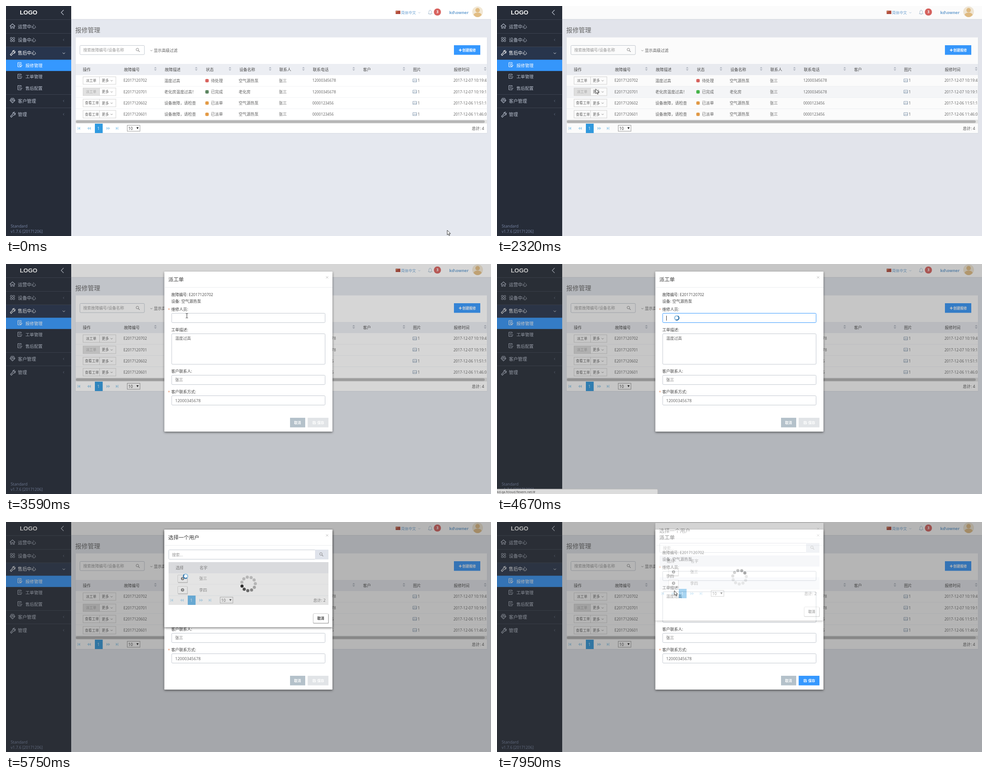
An HTML page that plays this animation: 1086x516 px, repeating every 8 s.

```html
<!DOCTYPE html>
<html lang="zh-CN">
<head>
<meta charset="utf-8">
<title>报修管理</title>
<style>
html,body{margin:0;width:100%;height:100%;overflow:hidden;background:#e5e8ef}
svg{display:block;width:100%;height:100%;font-family:"Open Sans","Noto Sans CJK SC","Noto Sans CJK",sans-serif}
.dialog{filter:drop-shadow(0 2px 2.6px rgba(0,0,0,.5))}
</style>
</head>
<body>
<svg id="stage" viewBox="0 0 1086 516"></svg>
<script>
const LOOP = 8000;
const BLUE = '#3598ff', LINE = '#e7ecf1', HEAD = '#eceef3', TEXT = '#606060', DARK = '#444', EDGE = '#c2c8d0';
const PHONE_A = '12000345678', PHONE_B = '0000123456';

// Drawing helpers; text is placed by its left edge and vertical centre
const text = (x, y, s, size = 8.9, fill = TEXT, more = '') =>
  `<text x="${x}" y="${y + size * .37}" font-size="${size}" fill="${fill}" ${more}>${s}</text>`;
const bold = (x, y, s, size, fill) => text(x, y, s, size, fill, 'font-weight="700"');
const rect = (x, y, w, h, fill, more = '') =>
  `<rect x="${x}" y="${y}" width="${w}" height="${h}" fill="${fill}" ${more}/>`;
const box = (x, y, w, h, stroke, r = 2, fill = '#fff', id = '') =>
  rect(x, y, w, h, fill, `stroke="${stroke}" rx="${r}" ${id && `id="${id}"`}`);
const line = (d, stroke, width = 1) => `<path d="${d}" fill="none" stroke="${stroke}" stroke-width="${width}"/>`;
const shape = (d, fill) => `<path d="${d}" fill="${fill}"/>`;
const circle = (x, y, r, fill, more = '') => `<circle cx="${x}" cy="${y}" r="${r}" fill="${fill}" ${more}/>`;
const group = (id, body, more = '') => `<g id="${id}" ${more}>${body}</g>`;
const down = (x, y, c, r = 2.2) => line(`M${x - r} ${y - r / 2}l${r} ${r}l${r} ${-r}`, c, .9);
const left = (x, y, c, r = 2.2) => line(`M${x + r / 2} ${y - r}l${-r} ${r}l${r} ${r}`, c, .9);
const lens = (x, y, c) => circle(x - .8, y - .8, 2.9, 'none', `stroke="${c}"`) + line(`M${x + 1.3} ${y + 1.3}l3 3`, c, 1.2);
const sorter = x => shape(`M${x - 3} 140l3 -3.2l3 3.2zM${x - 3} 142l3 3.2l3 -3.2z`, '#b4b9c3');

function wrench(x, y, c) {
  return line(`M${x - 5} ${y + 4}l5 -5q-1 -4 4 -4.4l-2 2.4l2 2l2 -2q.4 5 -4 4.2l-5 5z`, c, 1.1);
}
function sheet(x, y, c) {
  return line(`M${x + 3} ${y - 2}v-3h-7.5v9.5h7.5v-2M${x - 2.5} ${y - 2}h4M${x - 2.5} ${y + 1}h3M${x + 1} ${y + 1}h4.5`, c);
}

function sidebar() {
  const c = '#b7bfce';
  const rule = y => rect(0, y, 146, 1, '#3c4351');
  const item = (y, s, fill = c) => text(26.5, y, s, 10.2, fill);
  const sub = (y, s, fill = c) => text(43.5, y, s, 9.6, fill);
  return rect(0, 0, 146, 516, '#262c38') +
    rect(0, 91, 146, 30, '#28354d') + rect(0, 120.5, 146, 25.3, BLUE) +
    [30, 61, 91, 198, 228].map(rule).join('') +
    `<text x="31" y="19" font-size="13.3" font-weight="700" fill="#fff" font-family="Liberation Sans,sans-serif">LOGO</text>` +
    line('M129 9l-5.5 5.5l5.5 5.5', '#c3cad6', 1.1) +
    item(46, '运营中心') + item(76, '设备中心') + item(105.5, '售后中心', '#fff') +
    sub(133, '报修管理', '#fff') + sub(158.5, '工单管理') + sub(184, '售后配置') +
    item(213, '客户管理') + item(243, '管理') +
    [76, 213, 243].map(y => left(129, y, '#657084')).join('') + down(129.5, 106, '#fff', 2.6) +
    line('M8.5 45.5l6 -5.5l6 5.5M10.5 44.5v5.5h2.5v-4h3v4h2.5v-5.5', c, 1.1) +
    [[10, 70.5], [15.5, 70.5], [10, 76], [15.5, 76]].map(([x, y]) => box(x, y, 3.8, 3.8, c, 1, 'none')).join('') +
    wrench(14.5, 105, '#fff') + sheet(31, 132, '#fff') + circle(33, 133.5, 2, BLUE, 'stroke="#fff"') +
    sheet(31, 158, c) + sheet(31, 183.5, c) +
    line('M9 212l3 -5h5l3 5l-5.5 5.5zM11 212l3.5 -3l4 4M13 214l2 -2', c, 1.1) + wrench(15, 243.5, c) +
    text(10.5, 494, 'Standard', 8.9, '#7886a6') + text(10.5, 505.5, 'v1.7.6 [20171206]', 8.7, '#7886a6');
}

function topbar() {
  const c = '#6ea3d3';
  return rect(146, 0, 940, 30, '#fff') + rect(146, 29.5, 940, 1, '#d3d7de') +
    rect(872.5, 10.5, 10.5, 7.5, '#b04a3c') + circle(875, 12.8, 1.1, '#e8b85a') +
    text(884.5, 14.5, '简体中文', 8.4, c) + down(925.5, 15, '#a9c3dc') +
    line('M945.5 17.5h8.5q-1.6 -1.5 -1.6 -5q-.4 -3 -2.6 -3.4q-2.4 .4 -2.7 3.4q0 3.5 -1.6 5M948.7 19h2', '#a5bccf') +
    circle(966, 13.5, 8, '#d8635f') + bold(963.8, 13.3, '3', 8, '#fff') +
    bold(992.5, 14.5, 'kd\\owner', 9, c) +
    circle(1056, 13, 12, '#f2e8d5') + circle(1056, 9.5, 5, '#e2bd83') +
    shape('M1047 20q1 -4 6.5 -5h5q5.5 1 6.5 5q-4 5 -9 5t-9 -5z', '#e2bd83');
}

function pager(dx, dy, totalX, total) {
  const c = '#a9d6f1';
  const body = shape('M160.5 271h1.3v7h-1.3zM166 271v7l-4 -3.5zM186 271v7l-4 -3.5zM190 271v7l-4 -3.5z' +
    'M225 271v7l4 -3.5zM229 271v7l4 -3.5zM246 271v7l4 -3.5zM250 271h1.3v7h-1.3z', c) +
    rect(199, 264, 17.5, 21, '#2f9ae0') + text(204.6, 274.5, '1', 8.6, '#fff') +
    box(271.5, 267.5, 28.5, 13.5, '#999', 0) + text(274, 274.5, '10', 8.6, '#333') +
    shape('M292 272h5l-2.5 4.5z', '#222');
  return `<g transform="translate(${dx} ${dy})">${body}</g>` + text(totalX, dy + 275, '总计: ' + total, 8.9, DARK);
}

const ROWS = [
  ['派工单', 'E2017120702', '温度过高', '待处理', '#d9625e', '空气源热泵', PHONE_A, '2017-12-07 10:19:4'],
  ['派工单', 'E2017120701', '老化房温度过高！', '已完成', '#5c8560', '老化房', PHONE_A, '2017-12-07 10:19:1'],
  ['查看工单', 'E2017120602', '设备故障，请检查', '已派单', '#e39a45', '空气源热泵', PHONE_B, '2017-12-06 11:51:1'],
  ['查看工单', 'E2017120601', '设备故障，请检查', '已派单', '#e39a45', '空气源热泵', PHONE_B, '2017-12-06 11:46:0']
];

function row([act, code, desc, state, color, device, phone, date], i) {
  const y = 167.3 + 25.15 * i, off = i === 1;
  return rect(156, y - 12, 921, 25, '#fff', `id="row${i}"`) + rect(156, y + 12.5, 921, 1, LINE) +
    box(172.5, y - 8.5, 37, 17, '#d3d3d3', 0, off ? '#e1e1e1' : '#fff', 'act' + i) +
    box(209.5, y - 8.5, 36.5, 17, '#d3d3d3', 0) +
    text(act.length > 3 ? 176.8 : 179, y, act, 7.8, off ? '#a8a8a8' : TEXT) +
    text(214.5, y, '更多', 7.9) + down(236.5, y + .3, '#777') +
    text(263, y, code, 8.4) + text(354.5, y, desc) +
    rect(446.3, y - 3.6, 7.6, 7.6, color, `rx="2" id="dot${i}"`) +
    text(459, y, state) + text(521, y, device) + text(611, y, '张三') + text(686, y, phone, 8.4) +
    line(`M911 ${y - 3.5}h8.5v6.5h-8.5zM911.5 ${y + 2}l2.5 -2.5l2 1.5l1.5 -1.5l1.5 2`, '#7d93ab', .9) +
    text(921.8, y, '1', 8.6) + text(1002, y, date, 8.4);
}

function page() {
  const heads = [[172, '操作'], [264, '故障编号'], [355.5, '故障描述'], [447.5, '状态'], [522.5, '设备名称'],
    [612, '联系人'], [687, '联系电话'], [799.5, '客户'], [911.5, '图片'], [1002.5, '报修时间']];
  return text(155, 53.7, '报修管理', 14, '#666') +
    rect(155.5, 71, 922, 215, '#d6dae2') + rect(156, 70.5, 921, 214.5, '#fff') +
    box(165.5, 88.5, 144.5, 20.5, EDGE) + text(173, 99, '搜索故障编号/设备名称', 8.8, '#999') + lens(295, 98.5, '#888') +
    down(325.5, 100, '#777') + text(331, 100, '显示高级过滤') +
    rect(1003, 88, 59, 21.5, BLUE) + line('M1014 99h6.5M1017.25 95.75v6.5', '#fff', 1.7) +
    bold(1021.8, 99, '创建报修', 7.6, '#fff') +
    rect(156, 130, 921, 25, HEAD) + heads.map(([x, s]) => text(x, 142.5, s, 8.9, '#4c4c4c')).join('') +
    [334.5, 426, 501.5, 591.5, 666, 778.5, 891, 1073].map(sorter).join('') +
    ROWS.map(row).join('') +
    rect(156, 255.5, 921, 8, '#e6e6e6') + rect(156.5, 256.5, 915.5, 6, '#b6b6b6', 'rx="3"') +
    pager(0, 0, 1043, 4);
}

const frame = (h, title) => rect(354.5, 17, 376.5, h, '#fff', 'rx="1" class="sheet"') +
  text(363.3, 35, title, 11.6, '#3c3c3c') + line('M716.5 27.5l5 5m0 -5l-5 5', '#c4c4c4') + rect(354.5, 52, 376.5, 1, '#eaedf0');

function orderDialog() {
  const input = (y, h, s, id = '') => box(371, y, 343.5, h, EDGE, 2, '#fff', id) + text(378.7, y + 10.7, s);
  const label = (y, s) => text(370, y, s, 8.9, DARK);
  const star = y => text(362.5, y + 1, '*', 8.6, '#e58a5e');
  return frame(359, '派工单') +
    text(370, 68.5, '故障编号: E2017120702', 8.7, DARK) + label(84, '设备: 空气源热泵') +
    star(102) + label(101.8, '维修人员:') + input(110.5, 21, '', 'worker') +
    group('picked', text(378.7, 121.7, '李四')) + group('caret', rect(379, 116, 1, 11, '#333')) +
    label(147.8, '工单描述:') + input(156.5, 68.5, '温度过高') +
    label(240.8, '客户联系人:') + input(249.5, 21, '张三') +
    star(286.8) + label(286.8, '客户联系方式:') + input(295.5, 21, '') + text(378.7, 306.5, PHONE_A, 9.1) +
    rect(636, 345, 34, 21.5, '#b4c1ca') + bold(645, 356, '取消', 7.7, '#fff') +
    rect(675.5, 345, 46.5, 21.5, BLUE, 'id="save"') +
    line('M687 353h5l1.3 1.3v4.7h-6.3zM688.5 353v2h3v-2M688.5 359v-2.5h3.5v2.5', '#fff', .9) + bold(697, 356, '保存', 7.7, '#fff');
}

function userDialog() {
  const pick = (y, s, id) => rect(364, y - 12, 358, 25, '#fff', `id="${id}"`) + rect(364, y + 12.5, 358, 1, LINE) +
    rect(385, y - 7, 22, 17, '#bbb', 'rx="1"') + box(384.5, y - 8, 21.5, 16, '#c9c9c9', 1) +
    circle(395.3, y, 3.6, '#444') + line(`M394.5 ${y - 1.8}l1.8 1.8l-1.8 1.8`, '#fff', 1.1) + text(432.5, y, s);
  const dots = Array.from({length: 11}, () => circle(543, 138, 3.5, '#000', 'class="dot"')).join('');
  return frame(219, '选择一个用户') +
    box(364.5, 62.5, 328, 21, EDGE, 1) + text(371.5, 73.5, '搜索...', 8.9, '#999') +
    rect(692, 62, 30, 22, '#dfe3eb') + lens(706, 72.5, '#888') +
    rect(364, 90, 358, 25, HEAD) + text(380, 102.8, '选择', 8.9, '#4c4c4c') + text(433.5, 102.8, '名字', 8.9, '#4c4c4c') +
    group('people', pick(127, '张三', 'first') + pick(152.3, '李四', 'second')) +
    group('foot', pager(208, -99, 688, 2) + rect(687.5, 206, 35.5, 22, '#b5b5b5', 'rx="2"') +
      box(688, 205.5, 33.5, 21, '#ccc', 2) + bold(697, 216, '取消', 7.7, '#333')) +
    rect(364, 90, 358, 96, '#bbb', 'id="veil"') + group('spinner', dots);
}

const overlay = group('status', rect(-1, 505, 361, 12, '#dcdcdc', 'stroke="#b5b5b5" rx="2"') +
    text(0, 511, 'kd.qa.fcloud.flexem.net/#', 7.2, '#444')) +
  group('ime', rect(1059, 496, 32, 24, '#c3c8ea', 'rx="4"') + text(1064.5, 510, '中', 15, '#3d4a86')) +
  group('pointer', group('arrow', '<path d="M0 0v10.5l2.4 -2.2l1.6 3.7l1.7 -.8l-1.6 -3.5h3.3z" fill="#fff" stroke="#222" stroke-width=".9"/>') +
    group('beam', line('M-2.5 -5h2l.5 .5l.5 -.5h2M-2.5 5h2l.5 -.5l.5 .5h2M0 -4.5v9', '#333')) +
    group('busy', circle(0, 0, 4.8, '#fff', 'stroke="#9fc8e4" stroke-width="2.6"') +
      group('arc', line('M0 -4.8a4.8 4.8 0 0 1 0 9.6', '#3576ab', 2.4))));

const $ = id => document.getElementById(id);
$('stage').innerHTML = page() + sidebar() + topbar() +
  rect(0, 0, 1086, 516, '#333', 'id="shade"') +
  group('order', orderDialog(), 'class="dialog"') + group('user', userDialog(), 'class="dialog"') + overlay;

// Screen updates come in bursts; each picture holds until the next
const burst = (a, b, n) => Array.from({length: n}, (_, i) => a + (b - a) * i / (n - 1));
const STEPS = [0, ...burst(70, 1110, 11), ...burst(1230, 2150, 6), 2320, 2450, 2560, 2680, 2890, 3100, 3310,
  3430, 3590, 3750, 3870, 4180, 4570, 4700, 4860, 5100, 5260, 5420, 5580,
  ...burst(5750, 6650, 8), ...burst(6910, 7950, 8)].reverse();

const PATH = [[0, 988, 503], [1110, 232, 188], [1600, 190, 166], [2150, 194, 168], [2320, 221, 186], [2680, 300, 229],
  [3310, 312, 228], [3590, 405, 116], [3870, 409.5, 116], [4180, 405, 121], [4570, 402.5, 121], [6500, 402, 122],
  [6650, 398, 121], [6910, 398, 124], [7500, 397, 154]];
const SHADE = [[2150, 0], [2320, .02], [2450, .12], [2560, .2], [4180, .2], [4570, .28], [4700, .36]];
const ORDER = [[2450, 0, -90], [2680, .72, -58], [2890, 1, 0]];
const USER = [[4860, 0, -55], [5100, .5, -25], [5260, 1, -4], [5420, 1, 0], [7800, 1, 0], [7950, .42, -15]];

function at(keys, t) {
  const i = keys.findIndex(k => k[0] > t);
  if (i < 0) return keys[keys.length - 1].slice(1);
  if (!i) return keys[0].slice(1);
  const a = keys[i - 1], b = keys[i], p = (t - a[0]) / (b[0] - a[0]);
  return a.slice(1).map((v, n) => v + (b[n + 1] - v) * p);
}
const set = (id, name, value) => $(id).setAttribute(name, value);
const show = (id, on) => set(id, 'visibility', on ? 'visible' : 'hidden');
const between = (t, a, b) => t >= a && t < b;

function dialog(id, keys, t) {
  const [alpha, dy] = at(keys, t);
  set(id, 'opacity', alpha);
  set(id, 'display', alpha ? 'inline' : 'none');
  set(id, 'transform', `translate(0 ${dy})`);
}

function draw(now) {
  const t = STEPS.find(s => s <= now + .01);
  const [x, y] = at(PATH, t);

  ROWS.forEach((_, i) => {
    const top = 155.3 + 25.15 * i;
    set('row' + i, 'fill', t < 2400 && y >= top && y < top + 25 ? '#f8f9fb' : '#fff');
  });
  set('act0', 'fill', between(t, 1400, 2200) || between(t, 2450, 3200) ? '#e1e1e1' : '#fff');
  set('dot1', 'fill', t < 2320 ? '#5c8560' : '#45b649');
  set('shade', 'opacity', at(SHADE, t)[0]);

  dialog('order', ORDER, t);
  const filled = t < 3000 || t > 7700;
  set('picked', 'opacity', filled ? 1 : 0);
  set('save', 'fill', filled ? BLUE : '#e1e4e7');
  set('worker', 'stroke', between(t, 4570, 5400) ? BLUE : EDGE);
  set('caret', 'opacity', between(t, 4570, 5100) ? 1 : 0);

  dialog('user', USER, t);
  const loaded = t >= 5750, waiting = t < 6400;
  set('people', 'opacity', loaded ? 1 : 0);
  set('foot', 'transform', `translate(0 ${loaded ? 0 : -51})`);
  document.querySelector('#user .sheet').setAttribute('height', loaded ? 219 : 168);
  set('first', 'fill', between(t, 6400, 7100) ? '#f3f5f9' : '#fff');
  set('second', 'fill', t >= 7100 ? '#f3f5f9' : '#fff');
  set('veil', 'opacity', waiting ? .4 : 0);
  set('veil', 'height', loaded ? 96 : 45);
  set('spinner', 'opacity', waiting || t > 7600 ? 1 : 0);
  const head = 161.6 + .4 * (t - 5750), gap = 360 / 11;
  document.querySelectorAll('.dot').forEach((dot, i) => {
    const a = (head - i * gap) * Math.PI / 180;
    dot.setAttribute('cx', 543 + 15.3 * Math.cos(a));
    dot.setAttribute('cy', 138.8 + 15.3 * Math.sin(a));
    dot.setAttribute('opacity', Math.max(.2, .8 - .13 * i));
  });

  show('status', between(t, 4570, 5260));
  show('ime', between(t, 4700, 5100));
  const beam = between(t, 3590, 4570), busy = between(t, 4570, 6500);
  show('arrow', !beam && !busy);
  show('beam', beam);
  show('busy', busy);
  set('pointer', 'transform', `translate(${x} ${y})`);
  set('arc', 'transform', `rotate(${t * .4})`);
}

const start = performance.now();
function tick() {
  draw((performance.now() - start) % LOOP);
  requestAnimationFrame(tick);
}
tick();
</script>
</body>
</html>
```
